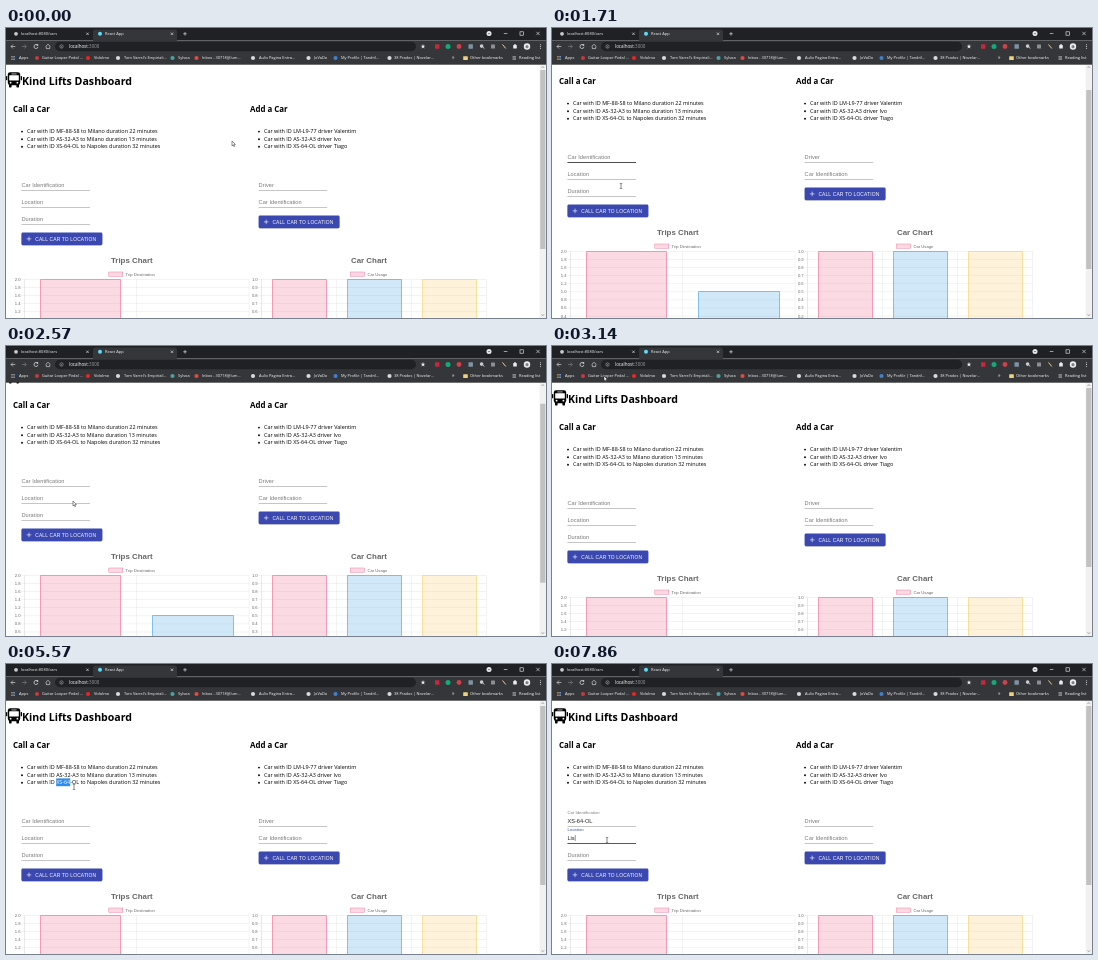
An HTML page with a canvas that plays this animation: 540 by 290 pixels, repeating every 8 s.

```html
<!DOCTYPE html>
<html lang="en">
<head>
<meta charset="utf-8">
<title>Dashboard</title>
<style>
html, body { margin: 0; width: 100%; height: 100%; overflow: hidden; background: #fff; }
canvas { display: block; width: 540px; height: 290px; }
</style>
</head>
<body>
<canvas id="stage"></canvas>
<script>
const W = 540, H = 290, LOOP = 8000, STEP = 1000 / 7;
const UI = '"Open Sans", "Noto Sans", sans-serif';
const SANS = '"Liberation Sans", Arial, sans-serif';
const MONO = '"Liberation Mono", monospace';
const PAGE_TOP = 36.7, INDIGO = '#3b48b0';
const PINK = '240,100,142', BLUE = '60,160,225', YELLOW = '248,206,100';

const canvas = document.getElementById('stage');
const ctx = canvas.getContext('2d');
const dpr = window.devicePixelRatio || 1;
canvas.width = W * dpr;
canvas.height = H * dpr;

// Keys are [tick, value, value...]; values are interpolated linearly.
const SCROLL = [[10, 0], [11, 12], [12, 28], [13, 62], [14, 90], [16, 90], [17, 62], [18, 22], [19, 6], [20, 0]];
const POINTER = [
  [0, 226, 113], [2, 205, 120], [5, 110, 148], [8, 69, 158], [14, 69, 158], [18, 67, 155],
  [20, 66, 140], [22, 52, 30], [23, 46, 5], [25, 48, 4], [27, 124, 2], [28, 132, 0], [30, 130, 6],
  [33, 82, 84], [36, 50, 119], [37, 52, 120], [39, 68, 123], [40, 78, 121], [42, 77, 122],
  [44, 48, 157], [48, 48, 157], [50, 50, 173], [55, 55, 176]
];
const SELECTED = [[36, 0], [37, 1], [38, 3], [39, 5], [40, 8]];

function at(keys, t) {
  if (t <= keys[0][0]) return keys[0].slice(1);
  for (let i = 1; i < keys.length; i++) {
    const a = keys[i - 1], b = keys[i];
    if (t <= b[0]) {
      const k = (t - a[0]) / (b[0] - a[0]);
      return a.slice(1).map((v, j) => v + (b[j + 1] - v) * k);
    }
  }
  return keys[keys.length - 1].slice(1);
}

const ramp = (t, from, length) => Math.min(1, Math.max(0, (t - from) / length));
const snap = v => Math.floor(v) + 0.5;

function rect(x, y, w, h, color) {
  ctx.fillStyle = color;
  ctx.fillRect(x, y, w, h);
}

function round(x, y, w, h, r, color) {
  ctx.fillStyle = color;
  ctx.beginPath();
  ctx.roundRect(x, y, w, h, r);
  ctx.fill();
}

function dot(x, y, r, color) {
  ctx.fillStyle = color;
  ctx.beginPath();
  ctx.arc(x, y, r, 0, 7);
  ctx.fill();
}

function path(points, color, width = 0.6) {
  ctx.strokeStyle = color;
  ctx.lineWidth = width;
  ctx.beginPath();
  points.forEach(([x, y]) => ctx.lineTo(x, y));
  ctx.stroke();
}

// y is the optical middle of the line of text.
function text(s, x, y, size, color, { font = UI, weight = 400, align = 'left', spacing = 0 } = {}) {
  ctx.font = `${weight} ${size}px ${font}`;
  ctx.letterSpacing = spacing * size + 'px';
  ctx.textAlign = align;
  ctx.fillStyle = color;
  ctx.fillText(s, x, y + size * 0.35);
  const width = ctx.measureText(s).width;
  ctx.letterSpacing = '0px';
  return width;
}

function cross(x, y, r, color) {
  path([[x - r, y - r], [x + r, y + r]], color);
  path([[x + r, y - r], [x - r, y + r]], color);
}

function plus(x, y, r, color) {
  path([[x - r, y], [x + r, y]], color);
  path([[x, y - r], [x, y + r]], color);
}

function drawTabs(first) {
  const ink = '#f1f3f4';
  rect(0, 0, W, 12.5, '#202124');
  round(first ? 3 : 87, 1.5, 84, 13, 2.5, '#35363a');
  dot(10, 5.8, 1.9, '#c8cacd');
  text('localhost:8080/cars', 15, 5.8, 4, ink);
  cross(81.5, 5.8, 1.2, ink);
  dot(94, 5.8, 2, '#61dafb');
  text('React App', 99, 5.8, 4, ink);
  cross(166, 5.8, 1.2, ink);
  plus(179, 5.8, 1.8, ink);
  dot(483, 5.5, 2.5, '#e8eaed');
  path([[482, 5.1], [483, 6.1], [484, 5.1]], '#202124', 0.6);
  path([[497.8, 5.5], [501.4, 5.5]], ink, 0.6);
  ctx.strokeRect(514, 3.8, 3.4, 3.4);
  cross(532, 5.5, 1.7, ink);
}

function drawToolbar(first) {
  rect(0, 12.5, W, PAGE_TOP - 12.5, '#35363a');
  const ink = '#e8eaed', y = 18.5;
  path([[9.3, y], [5, y]], ink);
  path([[7, y - 2], [5, y], [7, y + 2]], ink);
  path([[16, y], [20.3, y]], '#85878b');
  path([[18.3, y - 2], [20.3, y], [18.3, y + 2]], '#85878b');
  ctx.strokeStyle = ink;
  ctx.lineWidth = 0.7;
  ctx.beginPath();
  ctx.arc(30, y, 2, 0.2, 5.4);
  ctx.stroke();
  rect(30.6, y - 2.2, 1.6, 1.4, ink);
  path([[39.6, y], [42, y - 2.2], [44.4, y]], ink);
  path([[40.3, y], [40.3, y + 2.1], [43.7, y + 2.1], [43.7, y]], ink);

  round(49, 13.8, 361, 9.4, 4.7, '#202124');
  ctx.strokeStyle = '#bdc1c6';
  ctx.lineWidth = 0.5;
  ctx.beginPath();
  ctx.arc(55.5, y, 1.7, 0, 7);
  ctx.stroke();
  rect(55.2, y - 0.3, 0.6, 1.2, '#bdc1c6');
  const w = text('localhost', 63, y, 4.5, '#fff');
  text(first ? ':8080/cars' : ':3000', 63 + w, y, 4.5, '#9aa0a6');

  ctx.fillStyle = ink;
  ctx.beginPath();
  for (let i = 0; i < 10; i++) {
    const r = i % 2 ? 1 : 2.4, a = i * Math.PI / 5 - Math.PI / 2;
    ctx.lineTo(417 + r * Math.cos(a), y + r * Math.sin(a));
  }
  ctx.fill();
  round(429, y - 2.2, 4.4, 4.4, 0.5, '#c5283d');
  dot(442, y, 2.5, '#15a878');
  dot(453, y, 2.4, '#d0424a');
  round(462.5, y - 2.2, 4.4, 4.4, 0.5, '#7f93a5');
  dot(475.6, y - 0.4, 1.8, '#c9ccd0');
  path([[476.8, y + 0.6], [478.4, y + 2]], ink, 0.8);
  round(485, y - 2, 4, 4, 0.5, '#8b8e93');
  path([[496.5, y - 2], [499.8, y + 2]], '#e6cf9a', 1);
  round(507.2, y - 1.6, 3.6, 3.6, 0.6, ink);
  dot(509, y - 1.7, 0.8, ink);
  dot(521, y, 3.2, '#eceff1');
  dot(521, y + 0.2, 1.6, '#79848a');
  [-1.7, 0, 1.7].forEach(d => dot(534.5, y + d, 0.5, ink));
}

const BOOKMARKS = [
  [31, 36, '#c7393c', 'Guitar Looper Pedal ...'],
  [82, 88, '#f02222', 'Vidolmo'],
  [112, 118, '#d8dadd', "Tom Varrel's Empiriali..."],
  [166.5, 172, '#4aa3a0', 'Sylvoa'],
  [190.5, 196, '#e14a3d', 'Inbox - 30718@lum...'],
  [247, 253, '#d8dadd', 'Aulix Pagina Entra...'],
  [302.5, 308, '#d8dadd', 'JoVaDo'],
  [329.5, 335, '#3f7fd0', 'My Profile | Tandril...'],
  [383.5, 388, '#d8dadd', '38 Prados | Novelar...']
];

function drawBookmarks() {
  const y = 30, ink = '#f8f9fa';
  const colors = ['#ea5b4f', '#f2b83a', '#5b93e8'];
  for (let i = 0; i < 9; i++) {
    rect(5 + (i % 3) * 1.5, y - 2 + Math.floor(i / 3) * 1.5, 1, 1, colors[i % 3]);
  }
  text('Apps', 13, y, 4, ink);
  for (const [ix, x, color, label] of BOOKMARKS) {
    dot(ix, y, 2.1, color);
    text(label, x, y, 3.95, ink);
  }
  text('»', 446, y - 0.3, 5, ink);
  round(457.2, y - 1.8, 4.6, 3.7, 0.5, '#f0d27c');
  text('Other bookmarks', 464, y, 4, ink);
  for (let i = -1; i < 2; i++) path([[506.5, y + i * 1.3], [510, y + i * 1.3]], ink, 0.5);
  text('Reading list', 513, y, 4, ink);
}

function drawBus() {
  round(1.8, 44.2, 12.4, 13, 2.4, '#000');
  round(0, 48, 1.3, 4.2, 0.5, '#000');
  round(14.7, 48, 1.3, 4.2, 0.5, '#000');
  round(3, 55.5, 2.6, 3.9, 0.7, '#000');
  round(10.4, 55.5, 2.6, 3.9, 0.7, '#000');
  round(3.2, 47.2, 9.6, 5.2, 0.5, '#fff');
  rect(5.4, 45.6, 5.2, 0.7, '#fff');
  dot(4.6, 54.7, 0.9, '#fff');
  dot(11.4, 54.7, 0.9, '#fff');
}

function drawList(x, lines) {
  lines.forEach((s, i) => {
    const y = 103.3 + i * 7.6;
    dot(x - 5, y + 0.3, 0.95, '#000');
    text(s, x, y, 5.43, '#000');
  });
}

function drawSelection(t) {
  const n = t < 43 ? Math.floor(at(SELECTED, t)[0]) : 0;
  if (!n) return;
  const part = 'XS-64-OL'.slice(0, n);
  ctx.font = `400 5.43px ${UI}`;
  const x = 21 + ctx.measureText('Car with ID ').width;
  rect(x, 114.4, ctx.measureText(part).width, 7.8, '#2f8cf0');
  text(part, x, 118.5, 5.43, '#fff');
}

function drawField(x, y, label, { hover = false, focus = false, lift = 0, value = '', caret = false } = {}) {
  const size = 5.63 * (1 - 0.25 * lift);
  text(label, x, y - 8.2 * lift, size, focus ? INDIGO : '#797979', { font: SANS, spacing: 0.009 });
  const w = value ? text(value, x, y, 5.63, '#222', { font: SANS }) : 0;
  if (caret) rect(x + w + 0.3, y - 3, 0.45, 6, '#222');
  if (hover || focus) rect(x, y + 5, 68.6, 0.8, focus ? '#2a2f4c' : '#222');
  else rect(x, y + 5.2, 68.6, 0.5, '#8c8c8c');
}

function drawButton(x, y) {
  round(x + 0.2, y + 0.6, 80.6, 12.6, 1.4, 'rgba(0,0,0,.16)');
  round(x, y, 81, 12.6, 1.4, INDIGO);
  plus(x + 7.6, y + 6.3, 2.3, '#fff');
  text('CALL CAR TO LOCATION', x + 13.8, y + 6.3, 4.92, '#fff', { font: SANS, spacing: 0.0286 });
}

function drawLegend(label, mid) {
  const boxW = 14, gap = 2.8;
  ctx.font = `400 4.2px ${SANS}`;
  const x = mid - (boxW + gap + ctx.measureText(label).width) / 2;
  rect(x, 244, boxW, 4.2, `rgba(${PINK},.24)`);
  ctx.strokeStyle = `rgb(${PINK})`;
  ctx.lineWidth = 0.4;
  ctx.strokeRect(x, 244, boxW, 4.2);
  text(label, x + boxW + gap, 246.2, 4.2, '#666', { font: SANS });
}

function drawChart({ left, right, mid, title, legend, max, step, bars }) {
  const top = 251.5, bottom = 332.2, grid = '#e4e4e4';
  text(title, mid, 231.8, 7.9, '#666', { font: SANS, weight: 700, align: 'center' });
  drawLegend(legend, mid);

  for (let i = 0; i <= 10; i++) {
    const y = top + (bottom - top) * i / 10, v = max - i * step;
    rect(left - 3, y - 0.2, right - left + 3, 0.45, i === 10 ? '#c4c4c4' : grid);
    text(i === 10 ? '0' : v.toFixed(1), left - 3.8, y, 4.2, '#666', { font: SANS, align: 'right' });
  }
  const slot = (right - left) / bars.length;
  for (let i = 0; i <= bars.length; i++) {
    rect(left + slot * i - 0.2, top, 0.45, bottom - top + 3.4, i ? grid : '#cfcfcf');
  }
  bars.forEach(([name, value, color], i) => {
    const c = left + slot * (i + 0.5), w = slot * 0.72;
    const x1 = snap(c - w / 2), x2 = snap(c + w / 2);
    const y = snap(bottom - (bottom - top) * value / max);
    rect(x1, y, x2 - x1, bottom - y, `rgba(${color},.24)`);
    path([[x1, bottom], [x1, y], [x2, y], [x2, bottom]], `rgb(${color})`, 0.6);
    text(name, c, 338, 4.2, '#666', { font: SANS, align: 'center' });
  });
}

const TRIPS = {
  left: 18.4, right: 243, mid: 125.8, title: 'Trips Chart', legend: 'Trip Destination', max: 2, step: 0.2,
  bars: [['Milano', 2, PINK], ['Napoles', 1, BLUE]]
};
const CARS = {
  left: 255.5, right: 480.7, mid: 363, title: 'Car Chart', legend: 'Car Usage', max: 1, step: 0.1,
  bars: [['MF-88-S8', 1, PINK], ['AS-32-A3', 1, BLUE], ['XS-64-OL', 1, YELLOW]]
};

function drawDashboard(t, scroll) {
  ctx.save();
  ctx.translate(0, -scroll);
  drawBus();
  text('Kind Lifts Dashboard', 16, 53, 10.6, '#000', { weight: 700 });
  text('Call a Car', 7, 81.3, 7.9, '#000', { weight: 700 });
  text('Add a Car', 244, 81.3, 7.9, '#000', { weight: 700 });
  drawList(21, [
    'Car with ID MF-88-S8 to Milano duration 22 minutes',
    'Car with ID AS-32-A3 to Milano duration 13 minutes',
    'Car with ID XS-64-OL to Napoles duration 32 minutes'
  ]);
  drawList(258, [
    'Car with ID LM-L9-77 driver Valentim',
    'Car with ID AS-32-A3 driver Ivo',
    'Car with ID XS-64-OL driver Tiago'
  ]);
  drawSelection(t);

  const onId = t >= 45 && t < 51, onPlace = t >= 51;
  drawField(15.4, 157.2, 'Car Identification', {
    hover: t >= 7 && t < 17, focus: onId, lift: ramp(t, 44, 2),
    value: t >= 47 ? 'XS-64-OL' : '', caret: onId
  });
  drawField(15.4, 174, 'Location', {
    focus: onPlace, lift: ramp(t, 50, 2),
    value: 'Lis'.slice(0, Math.max(0, t - 52)), caret: onPlace
  });
  drawField(15.4, 191, 'Duration');
  drawButton(15.4, 204.6);
  drawField(252.6, 157.2, 'Driver');
  drawField(252.6, 174, 'Car Identification');
  drawButton(252.6, 187.6);

  drawChart(TRIPS);
  drawChart(CARS);
  text('Project by:', 7, 351, 5.43, '#000', { weight: 700 });
  ['Sandro Velini 40718', 'Ivan Sá Moreira 31254', 'Tiago Valderez 28467'].forEach((s, i) =>
    text('- ' + s, 7, 358.8 + i * 7.6, 5.43, '#000'));
  ctx.restore();

  rect(533.6, PAGE_TOP, 6.4, H - PAGE_TOP, '#f1f1f1');
  rect(534.2, 42 + scroll * 0.715, 5.2, 179, '#c1c1c1');
  path([[535.6, 39.8], [536.8, 38.6], [538, 39.8]], '#606060');
  path([[535.6, 286.4], [536.8, 287.6], [538, 286.4]], '#606060');
}

function drawJson() {
  const cars = [['LM-L9-77', 'Valentim'], ['AS-32-A3', 'Ivo'], ['XS-64-OL', 'Tiago']]
    .map(([id, driver]) => ({ id, driver }));
  text(JSON.stringify(cars), 3, 42, 4.6, '#000', { font: MONO });
}

function drawPointer(t) {
  const [x, y] = at(POINTER, t);
  const beam = (t >= 7 && t < 17) || (t >= 34 && t <= 42) || t >= 44;
  if (beam) {
    path([[x - 1.3, y - 2.7], [x, y - 2.3], [x + 1.3, y - 2.7]], '#333', 0.5);
    path([[x - 1.3, y + 2.7], [x, y + 2.3], [x + 1.3, y + 2.7]], '#333', 0.5);
    path([[x, y - 2.4], [x, y + 2.4]], '#333', 0.6);
    return;
  }
  ctx.beginPath();
  [[0, 0], [0, 4.9], [1.1, 3.9], [1.9, 5.6], [2.6, 5.3], [1.9, 3.6], [3.4, 3.5]]
    .forEach(([dx, dy]) => ctx.lineTo(x + dx, y + dy));
  ctx.closePath();
  ctx.fillStyle = '#fff';
  ctx.fill();
  ctx.strokeStyle = '#222';
  ctx.lineWidth = 0.5;
  ctx.stroke();
}

function draw(now) {
  const t = Math.floor(((now + 6) % LOOP) / STEP);
  const json = t >= 24 && t < 28;
  ctx.setTransform(dpr, 0, 0, dpr, 0, 0);
  rect(0, 0, W, H, '#fff');
  if (json) drawJson();
  else drawDashboard(t, at(SCROLL, t)[0]);
  drawTabs(json);
  drawToolbar(json);
  drawBookmarks();
  drawPointer(t);
}

function loop() {
  draw(performance.now());
  requestAnimationFrame(loop);
}
loop();
</script>
</body>
</html>
```
